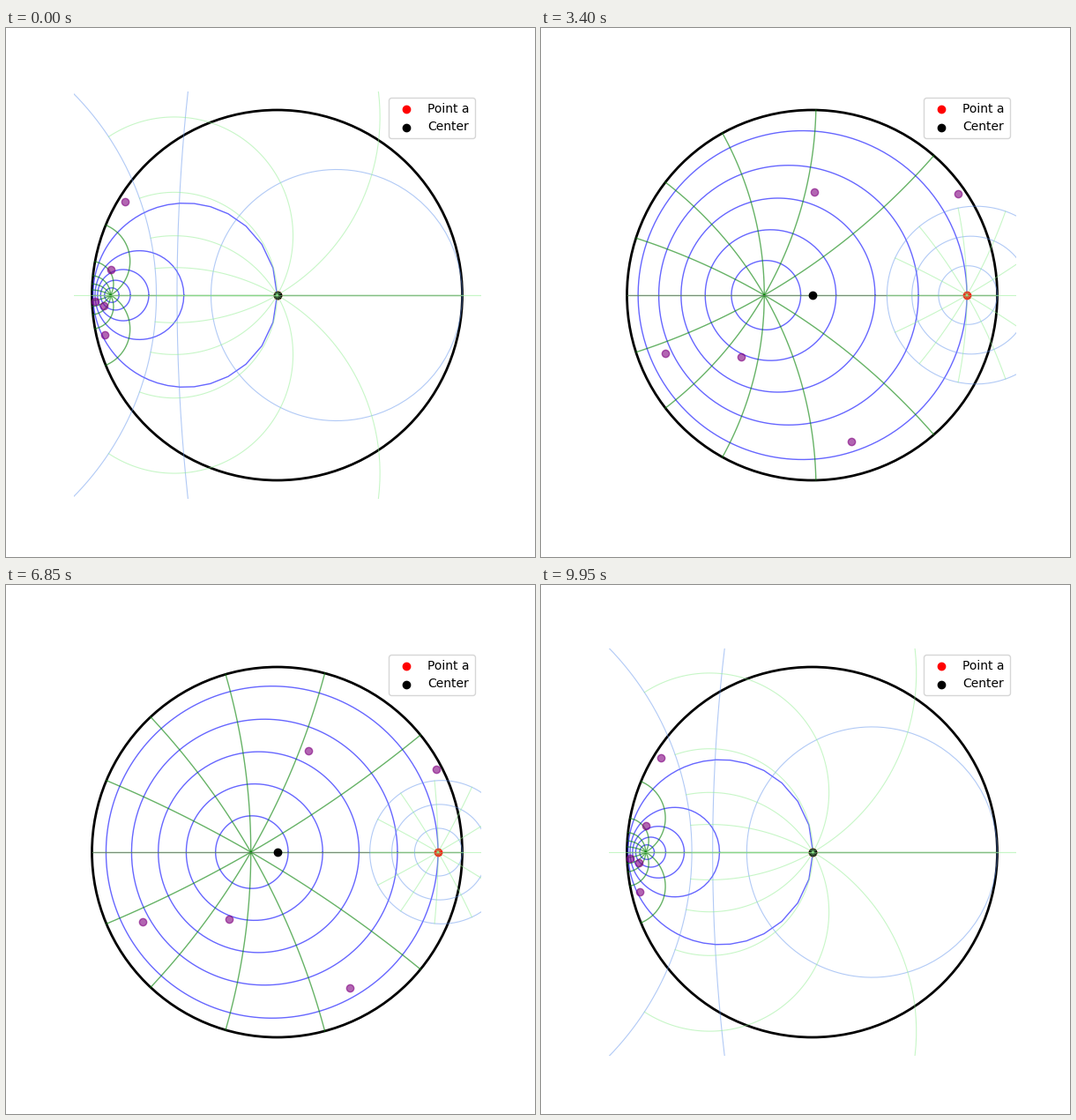
Animation of 600x600 px, one loop 10 s. Source, as a matplotlib script:

```python
import numpy as np
import matplotlib.pyplot as plt
from matplotlib.animation import FuncAnimation

FRAMES, INTERVAL = 200, 50
A = 0.9  # base position of point a

fig, ax = plt.subplots(figsize=(6, 6), dpi=100)
ax.set_xlim(-1.1, 1.1)
ax.set_ylim(-1.1, 1.1)
ax.set_aspect("equal")
ax.axis("off")


def mobius(z, t):
    """Disc automorphism that moves t to the origin."""
    return (z - t) / (1 - t * z)


def polar_grid(center, radii, reach):
    """Circles and twelve spokes around a centre, as complex paths."""
    turn = np.exp(1j * np.linspace(0, 2 * np.pi, 200))
    spoke = np.linspace(0, reach, 100)
    circles = [center + r * turn for r in radii]
    spokes = [center + spoke * np.exp(1j * a)
              for a in np.linspace(0, 2 * np.pi, 12, endpoint=False)]
    return circles, spokes


curves = []


def add_curves(paths, **style):
    for path in paths:
        line, = ax.plot([], [], **style)
        curves.append((line, path))


ax.add_patch(plt.Circle((0, 0), 1, fill=False, color="black", lw=2))

circles, spokes = polar_grid(0, np.linspace(0.2, 0.9, 5), 1)
add_curves(circles, color="blue", alpha=0.6, lw=1)
add_curves(spokes, color="green", alpha=0.6, lw=1)
ax.plot([-1, 1], [0, 0], color="gray", lw=0.5)

circles, spokes = polar_grid(A, (0.1, 0.2, 0.3), 0.3)
add_curves(circles, color="cornflowerblue", alpha=0.5, lw=0.8, zorder=4)
add_curves(spokes, color="lightgreen", alpha=0.5, lw=0.8, zorder=4)

# Random points spread evenly over the disc
np.random.seed(42)
radius = np.sqrt(np.random.rand(5))
points = radius * np.exp(2j * np.pi * np.random.rand(5))

dots = ax.scatter(points.real, points.imag, color="purple", alpha=0.6, zorder=3)
point_a = ax.scatter([0], [0], color="red", label="Point a", zorder=3)
ax.scatter([0], [0], color="black", label="Center", zorder=3)
ax.legend(loc="upper right")


def update(frame):
    t = A * (1 + np.cos(4 * np.pi * frame / FRAMES)) / 2
    for line, path in curves:
        w = mobius(path, t)
        line.set_data(w.real, w.imag)
    w = mobius(points, t)
    dots.set_offsets(np.column_stack([w.real, w.imag]))
    point_a.set_offsets([[mobius(A, t), 0]])
    return []


anim = FuncAnimation(fig, update, frames=FRAMES, interval=INTERVAL,
                     repeat=True, repeat_delay=0)
plt.show()
```
